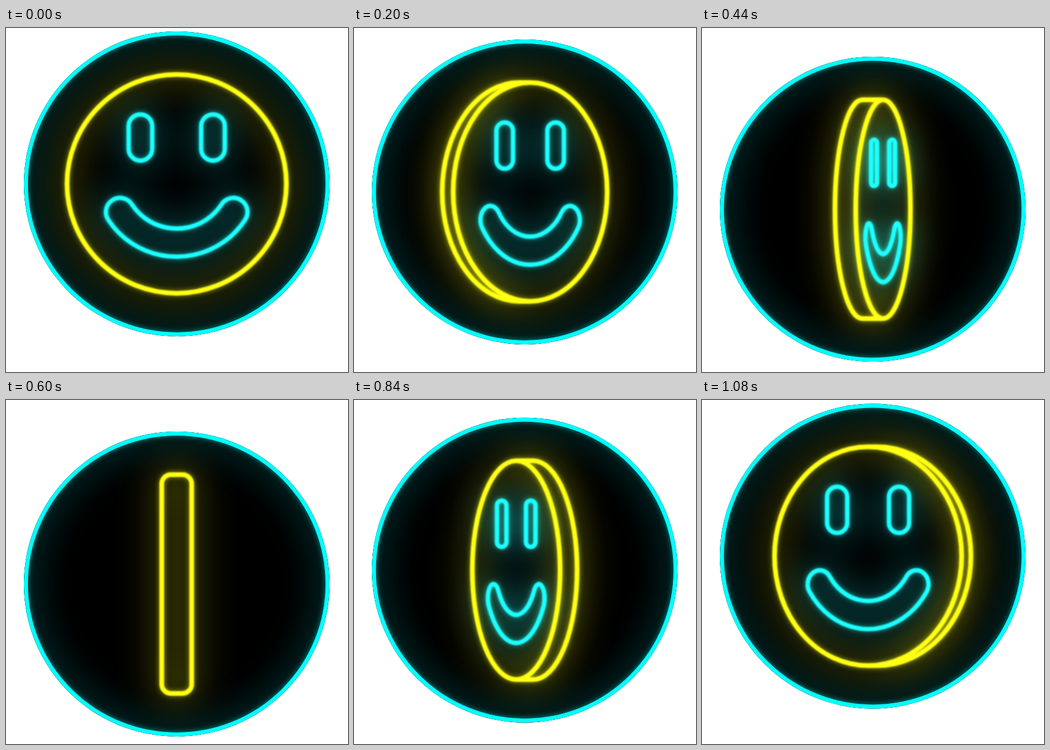
Write an HTML page with a canvas that moves like this. It is 594 px wide and 599 px high and loops after 1.12 s.

```html
<!DOCTYPE html>
<html lang="en">
<head>
<meta charset="utf-8">
<title>Neon smiley coin</title>
<style>
html, body { margin: 0; width: 100%; height: 100%; overflow: hidden; background: #fff; }
canvas { display: block; }
</style>
</head>
<body>
<canvas id="stage" width="594" height="599"></canvas>
<script>
const ctx = document.getElementById('stage').getContext('2d');
const LOOP = 1120, STEP = 40, EDGE_ON = 600;
const CX = 296.5, RING = 262, COIN = 190.5;
const CYAN = '#0ff', AQUA = '#1cffff', YELLOW = '#ffff14';

// Half the coin's visible thickness, by time away from the edge-on pose.
const DEPTH = [[0, 22], [160, 18], [320, 11.5], [400, 9.5], [480, 8], [520, 6.5], [560, 0], [600, 0]];

function lerpTable(table, x) {
  const i = Math.max(1, table.findIndex(([key]) => key >= x));
  const [x0, y0] = table[i - 1], [x1, y1] = table[i];
  return y0 + (y1 - y0) * (x - x0) / (x1 - x0);
}

function ringPath(cy) {
  const p = new Path2D();
  p.arc(CX, cy, RING, 0, 2 * Math.PI);
  return p;
}

function coinPath(cy, rx, shift) {
  const p = new Path2D();
  if (rx <= 0) {
    p.roundRect(CX - 26, cy - COIN, 52, 2 * COIN, 16);
    return p;
  }
  p.ellipse(CX + shift, cy, rx, COIN, 0, 0, 2 * Math.PI);
  if (shift) {
    p.moveTo(CX + shift, cy - COIN);
    p.lineTo(CX - shift, cy - COIN);
    p.ellipse(CX - shift, cy, rx, COIN, 0, -Math.PI / 2, Math.PI / 2, shift > 0);
    p.lineTo(CX + shift, cy + COIN);
  }
  return p;
}

function mouthPath() {
  const p = new Path2D();
  const r = 117.4, half = 24.5, cy = -15, spread = 57 * Math.PI / 180;
  const a = Math.PI / 2 - spread, b = Math.PI / 2 + spread;
  const capX = r * Math.sin(spread), capY = cy + r * Math.cos(spread);
  p.arc(0, cy, r + half, a, b);
  p.arc(-capX, capY, half, b, b + Math.PI);
  p.arc(0, cy, r - half, b, a, true);
  p.arc(capX, capY, half, a + Math.PI, a + 2 * Math.PI);
  p.closePath();
  return p;
}
const MOUTH = mouthPath();

function facePath(x, cy, scale) {
  const p = new Path2D();
  const w = 20.5 * scale;
  for (const side of [-1, 1]) {
    p.roundRect(x + side * 63 * scale - w, cy - 121, 2 * w, 80.5, w);
  }
  p.addPath(MOUTH, new DOMMatrix([scale, 0, 0, 1, x, cy]));
  return p;
}

function stroke(line, blur, alpha, mode) {
  ctx.filter = blur ? `blur(${blur}px)` : 'none';
  ctx.globalAlpha = alpha;
  ctx.globalCompositeOperation = mode;
  ctx.strokeStyle = line.color;
  ctx.lineWidth = line.width;
  ctx.stroke(line.path);
}

function draw(t) {
  const away = Math.abs(t - EDGE_ON);
  const cy = 296.2 - 24.8 * Math.cos(2 * Math.PI * t / LOOP);
  const rx = Math.min(COIN, away * 0.3594 - 10);
  const shift = lerpTable(DEPTH, away) * (t < EDGE_ON ? 1 : -1);

  const lines = [
    { path: ringPath(cy), color: CYAN, width: 7, soft: 0 },
    { path: coinPath(cy, rx, shift), color: YELLOW, width: 8, soft: 1 }
  ];
  if (rx > 8) {
    lines.push({ path: facePath(CX + shift, cy, rx / COIN), color: AQUA, width: 7.5, soft: 1 });
  }

  ctx.clearRect(0, 0, 594, 599);
  ctx.save();
  ctx.beginPath();
  ctx.arc(CX, cy, RING + 3.5, 0, 2 * Math.PI);
  ctx.fillStyle = '#000';
  ctx.fill();
  ctx.clip();
  for (const line of lines) stroke(line, 30, 1, 'lighter');
  for (const line of lines) stroke(line, 5, 0.5, 'lighter');
  for (const line of lines) stroke(line, line.soft, 1, 'source-over');
  ctx.restore();
}

let shown = -1;
function tick() {
  const t = Math.floor(performance.now() % LOOP / STEP) * STEP;
  if (t !== shown) draw(shown = t);
  requestAnimationFrame(tick);
}
tick();
</script>
</body>
</html>
```
